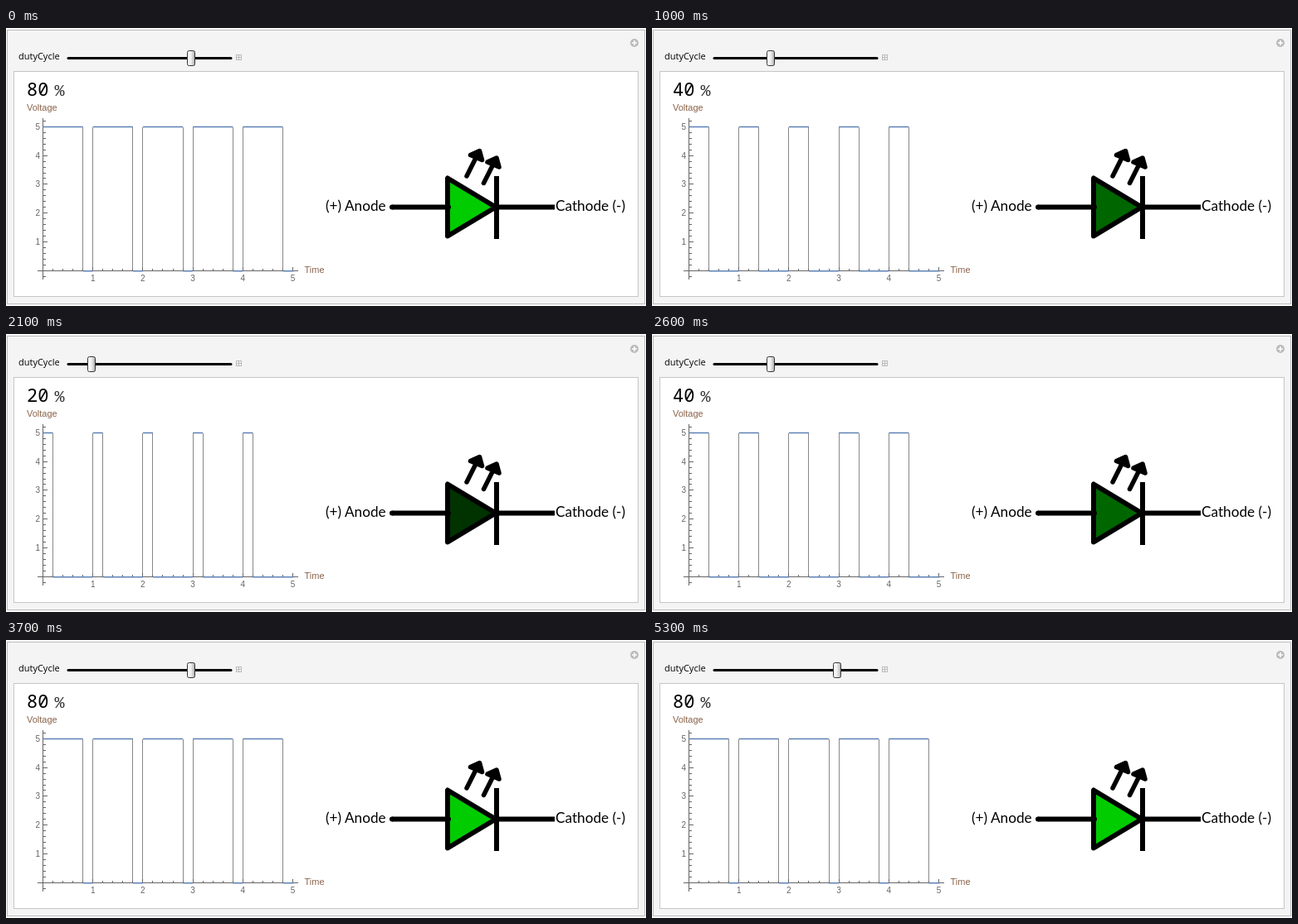
Write an HTML page that moves like this. It is 771x336 px and loops after 6000 ms.

```html
<!DOCTYPE html>
<html lang="en">
<head>
<meta charset="utf-8">
<title>PWM duty cycle</title>
<style>
  html, body { margin: 0; height: 100%; overflow: hidden; background: #fff; }
  svg { display: block; width: 771px; height: 336px; }
  text { white-space: pre; }
  .label { font: 11px "Liberation Sans", Arial, sans-serif; fill: #8a6249; }
  .tick { font: 10px "Liberation Sans", Arial, sans-serif; fill: #666; }
  .pin { font: 17.2px Lato, sans-serif; }
  .crisp { shape-rendering: crispEdges; fill: none; stroke-width: 1; }
  .thick { stroke: #000; stroke-width: 6; stroke-linejoin: round; }
</style>
</head>
<body>
<svg viewBox="0 0 771 336">
  <defs>
    <linearGradient id="metal">
      <stop offset="0" stop-color="#fff"/>
      <stop offset=".5" stop-color="#eee"/>
      <stop offset="1" stop-color="#aaa"/>
    </linearGradient>
    <g id="arrow" fill="none" stroke="#000" stroke-width="5.5" stroke-linecap="round" stroke-linejoin="round">
      <path d="M555 179L569 151M559.5 153.5L570.5 148.5L573.5 159.5Z"/>
    </g>
  </defs>

  <rect x="1.5" y="2.5" width="768" height="331" fill="#f4f4f4" stroke="#bbb"/>
  <rect x="9.5" y="52.5" width="752" height="272" fill="#fff" stroke="#c6c6c6"/>
  <circle cx="757" cy="18" r="5" fill="#bbb"/>
  <path d="M754 18h6M757 15v6" stroke="#fff" stroke-width="1.5"/>

  <text x="15" y="38" font-family="Open Sans, sans-serif" font-size="11">dutyCycle</text>
  <path d="M75 36.5H271" stroke="#000" stroke-width="3" stroke-linecap="round"/>
  <path class="crisp" d="M277.500 32.500h6v6h-6zM278 35.500h5M280.500 33v5" stroke="#bbb"/>
  <rect id="knob" y="27.500" width="9" height="18" rx="2" fill="url(#metal)" stroke="#333"/>

  <g font-size="22">
    <text id="value" x="25" y="82" font-family="Noto Sans Mono, monospace" font-weight="500"></text>
    <text id="percent" y="82" font-family="Liberation Mono, monospace" font-size="20" fill="#333">%</text>
  </g>

  <text class="label" x="25" y="100">Voltage</text>
  <text class="label" x="359.500" y="296">Time</text>
  <path id="edges" class="crisp" stroke="#888"/>
  <path id="axes" class="crisp" stroke="#666"/>
  <path id="levels" fill="none" stroke="#5e81b5" stroke-width="1.6"/>
  <g id="ticks" class="tick"></g>

  <path class="thick" d="M465 216.500H533M591 216.500H661"/>
  <circle cx="465" cy="216.500" r="3"/>
  <path id="diode" class="thick" d="M532 181.500V251.500L590 216.500Z"/>
  <circle cx="533" cy="216.500" r="3"/>
  <path class="thick" d="M591 179V255"/>
  <use href="#arrow"/>
  <use href="#arrow" x="20.500" y="8.500"/>
  <text class="pin" x="385" y="221">(+) Anode</text>
  <text class="pin" x="662" y="221">Cathode (-)</text>
</svg>
<script>
const $ = id => document.getElementById(id);
const LOOP = 6000;
// [start in ms, duty cycle in percent]
const STEPS = [
  [0, 80], [200, 70], [500, 60], [700, 50], [1000, 40], [1300, 30], [1600, 20],
  [1800, 10], [2100, 20], [2400, 30], [2600, 40], [2900, 50], [3200, 60],
  [3500, 70], [3700, 80], [4500, 90], [4800, 100], [5000, 90], [5300, 80]
];
const X0 = 44.5, Y0 = 293.5, UNIT_X = 60.2, UNIT_Y = 34.85;
const snap = v => Math.floor(v) + 0.5;
const px = t => X0 + t * UNIT_X;
const py = u => Y0 - u * UNIT_Y;

function drawAxes(full) {
  const minor = full ? 4 : 5, scale = full ? 2 : 1;
  let path = `M38 ${Y0}H352M${X0} 109V304`, labels = '';
  for (let i = 1; i <= 25; i++)
    path += `M${snap(px(i / 5))} ${Y0}v${i % 5 ? -3 : -5}`;
  for (let i = -1; i <= 5 * minor + 1; i++)
    path += `M${X0} ${snap(py(i / minor))}h${i % minor ? 3 : 5}`;
  for (let i = 1; i <= 5; i++) {
    labels += `<text x="${px(i)}" y="306" text-anchor="middle">${i}</text>`;
    labels += `<text x="41" y="${snap(py(i)) + 3}" text-anchor="end">${i * scale}</text>`;
  }
  $('axes').setAttribute('d', path);
  $('ticks').innerHTML = labels;
}

function drawWave(duty) {
  const top = snap(py(5));
  let levels = '', edges = '';
  if (duty === 1) {
    levels = `M${X0} ${snap(py(2.5))}H346.5`;
  } else {
    for (let k = 0; k < 5; k++) {
      const rise = px(k), fall = px(k + duty);
      levels += `M${rise} ${top}H${fall}M${fall} ${Y0 + 0.3}H${px(k + 1) + (k === 4)}`;
      edges += `M${snap(fall)} ${top}V${Y0}`;
      if (k) edges += `M${snap(rise)} ${top}V${Y0}`;
    }
  }
  $('levels').setAttribute('d', levels);
  $('edges').setAttribute('d', edges);
}

function render(value) {
  $('knob').setAttribute('x', 58.5 + 2 * value);
  $('value').textContent = value;
  $('percent').setAttribute('x', 32 + 13.2 * String(value).length);
  $('diode').setAttribute('fill', `rgb(0,${Math.round(2.55 * value)},0)`);
  drawAxes(value === 100);
  drawWave(value / 100);
}

let shown;
function tick() {
  const time = performance.now() % LOOP;
  const value = STEPS.findLast(([start]) => start <= time)[1];
  if (value !== shown) render(shown = value);
  requestAnimationFrame(tick);
}
tick();
</script>
</body>
</html>
```
